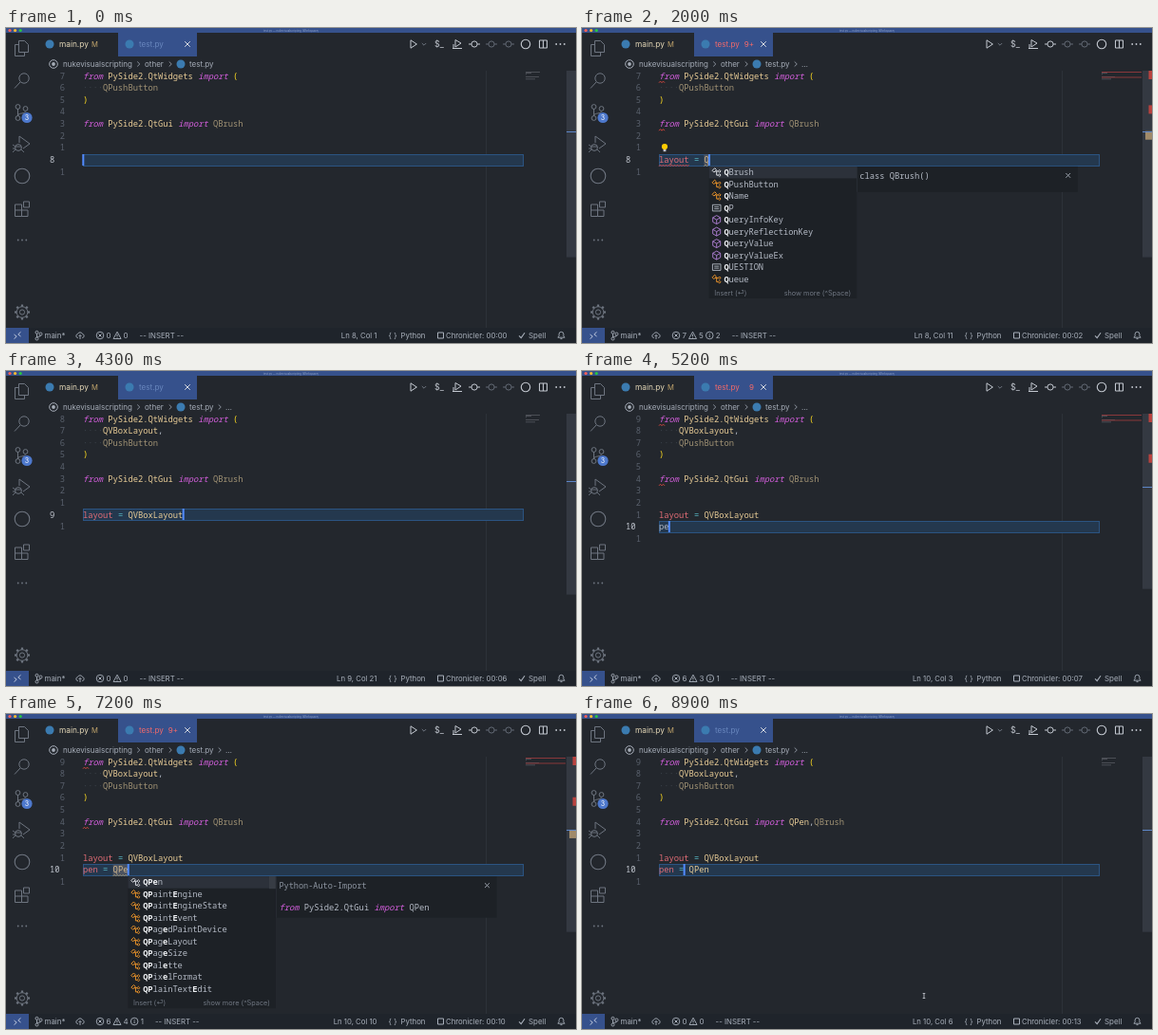
Animation of 600x332 px, one loop 9 s. Source, as an HTML page with a canvas:

```html
<!DOCTYPE html>
<html lang="en">
<head>
<meta charset="utf-8">
<title>Editor auto import</title>
<style>
html, body { margin: 0; width: 100%; height: 100%; overflow: hidden; background: #23272d; }
canvas { display: block; width: 600px; height: 332px; }
</style>
</head>
<body>
<canvas id="stage"></canvas>
<script>
const canvas = document.getElementById('stage');
const g = canvas.getContext('2d');
const dpr = window.devicePixelRatio || 1;
canvas.width = 600 * dpr;
canvas.height = 332 * dpr;

const LOOP = 9000, CW = 5.27, ROW = 12.63, LEFT = 81, TOP = 50.5;
const MONO = '"Noto Sans Mono", "DejaVu Sans Mono", monospace';
const SANS = 'Inter, Roboto, sans-serif';
const C = {
  bg: '#23272d', blue: '#36518c', text: '#b4bac5', dim: '#6e7580', key: '#d55fde',
  type: '#e8cc96', faded: '#a09274', red: '#e06c75', op: '#56b6c2', panel: '#1d2126',
  err: '#e0483e', orange: '#e8922a', purple: '#b180d7', white: '#d7dae0', paren: '#ffdc20'
};

// What is typed on the current line, by time.
const typed = [
  [0, ''], [300, 'l'], [400, 'la'], [600, 'lay'], [700, 'layo'], [900, 'layou'],
  [1000, 'layout'], [1200, 'layout '], [1400, 'layout ='], [1600, 'layout = '],
  [1900, 'layout = Q'], [2700, 'layout = QV'], [3200, 'layout = QVB'],
  [4200, 'layout = QVBoxLayout'], [4700, ''], [5000, 'p'], [5200, 'pe'], [5500, 'pen'],
  [5700, 'pen '], [5900, 'pen ='], [6200, 'pen = '], [6500, 'pen = Q'], [6800, 'pen = QP'],
  [7100, 'pen = QPe'], [7900, 'pen = QPen']
];
// Errors, warnings, hints.
const problems = [
  [0, [0, 0, 0]], [300, [7, 4, 3]], [1400, [7, 5, 2]], [2600, [0, 1, 0]], [4200, [0, 0, 0]],
  [4900, [6, 3, 1]], [5900, [6, 4, 1]], [7900, [0, 0, 0]]
];
const boxDoc = { head: 'Python-Auto-Import', module: 'QtWidgets' };
const popups = [
  [0, null],
  [500, { doc: boxDoc, pale: true, thumb: 83, items: 'QBoxLayout QFormLayout QGridLayout QHBoxLayout QPageLayout QTextLayout QVBoxLayout QStackedLayout QGraphicsLayout QGraphicsLayoutItem' }],
  [1200, null],
  [1900, { doc: { head: 'class QBrush()' }, pale: true, thumb: 0, kinds: 'cccwmmmmwc', items: 'QBrush QPushButton QName QP QueryInfoKey QueryReflectionKey QueryValue QueryValueEx QUESTION Queue' }],
  [2700, { doc: boxDoc, thumb: 72, items: 'QVBoxLayout QTableView QDoubleValidator QAccessibleValueChange… QAccessibleValueInterf… QAbstractItemView QToolBarChangeEvent QTabletEvent QAccessibleEvent QOpenGLVertexArrayObje…' }],
  [4200, null],
  [6600, { doc: { head: 'Python-Auto-Import', module: 'QtGui' }, pale: true, thumb: 13, items: 'QPen QPaintEngine QPaintEngineState QPaintEvent QPagedPaintDevice QPageLayout QPageSize QPalette QPixelFormat QPlainTextEdit' }],
  [7900, null]
];

const at = (list, t) => list.reduce((v, s) => (t >= s[0] ? s[1] : v), list[0][1]);
const rowY = r => TOP + r * ROW;

function rect(x, y, w, h, color) {
  g.fillStyle = color;
  g.fillRect(x, y, w, h);
}
function text(s, x, y, color, font, align = 'left') {
  g.font = font;
  g.textAlign = align;
  g.fillStyle = color;
  g.fillText(s, x, y + 0.5);
}
const sans = (s, x, y, color, size = 8, align) => text(s, x, y, color, size + 'px ' + SANS, align);
const mono = (s, x, y, color, style = '', align) => text(s, x, y, color, style + ' 8.78px ' + MONO, align);

function disc(x, y, r, color) {
  g.fillStyle = color;
  g.beginPath();
  g.arc(x, y, r, 0, 7);
  g.fill();
}
function ring(x, y, r, color, lw = 1) {
  g.strokeStyle = color;
  g.lineWidth = lw;
  g.beginPath();
  g.arc(x, y, r, 0, 7);
  g.stroke();
}
function path(x, y, d, color, lw = 1) {
  g.save();
  g.translate(x, y);
  g.strokeStyle = color;
  g.lineWidth = lw;
  g.stroke(new Path2D(d));
  g.restore();
}
const cross = (x, y, r, color) => path(x, y, `M${-r} ${-r}L${r} ${r}M${r} ${-r}L${-r} ${r}`, color);
const chevron = (x, y) => path(x, y, 'M-1.3 -2.5L1.3 0L-1.3 2.5', '#8a919c');
const dots = (x, y, color) => [-4.3, 0, 4.3].forEach(d => disc(x + d, y, 0.9, color));

// Draws [text, colour, style] pieces in a row.
function run(x, y, parts) {
  for (const [s, color, style] of parts) {
    mono(s, x, y, color, style);
    x += s.length * CW;
  }
}
const importLine = (module, names, color = C.type) => [
  ['from', C.key, 'italic'], [' PySide2.' + module + ' ', color], ['import', C.key, 'italic'], [' ', C.text], ...names
];

function squiggle(x, y, w, color) {
  g.strokeStyle = color;
  g.lineWidth = 0.9;
  g.beginPath();
  for (let i = 0; i <= w; i += 1.5) g.lineTo(x + i, y + (i % 3 ? -0.8 : 0.8));
  g.stroke();
}

function drawTitle() {
  rect(0, 0, 600, 5, C.blue);
  ['#ff5f57', '#febc2e', '#28c840'].forEach((c, i) => disc(4 + i * 5.6, 2.5, 1.6, c));
  sans('test.py — nukevisualscripting (Workspace)', 300, 2.2, '#8fa2c8', 2.9, 'center');
}

function drawTabs(p) {
  disc(46, 17, 4.5, '#3b7bb0');
  sans('main.py', 56, 17.5, '#e6d9b8', 8.3);
  sans('M', 90, 17.5, '#c2a56c', 7.6);
  rect(118, 5, 83, 25, C.blue);
  disc(130, 17, 4.5, '#3b7bb0');
  const count = p[0] + p[1];
  const color = p[0] ? '#f0696a' : p[1] ? C.type : '#6886bd';
  sans('test.py', 140, 17.5, color, 8.1);
  if (count) sans(count > 9 ? '9+' : String(count), 181, 17.5, color, 8, 'right');
  cross(191, 17, 2.8, C.white);
}

function drawToolbar() {
  const c = '#c3c8d0', low = '#626974';
  path(429, 17, 'M-3 -4.2L3.4 0L-3 4.2Z', c);
  path(440, 17, 'M-2.2 -1L0 1.2L2.2 -1', C.dim);
  sans('$_', 451, 17, c, 9);
  path(475, 17, 'M-2 -4.5L4 -1L-2 3ZM-5 4.5H5M-4 0V4', c);
  [[493, c], [511, low], [529, low]].forEach(([x, col]) => {
    ring(x, 17, 3.1, col);
    path(x, 17, 'M-6 0H-3.1M3.1 0H6', col);
  });
  ring(547, 17, 4.7, c, 1.1);
  path(565.5, 17, 'M-4 -4H4V4H-4ZM0 -4V4', c);
  dots(583.5, 17, c);
}

function drawCrumbs(more) {
  const c = '#a6adb8';
  ring(50, 38, 4.3, c);
  disc(50, 38, 1.9, c);
  sans('nukevisualscripting', 60, 38, c);
  chevron(139.5, 38);
  sans('other', 146, 38, c);
  chevron(173, 38);
  disc(184, 38, 4.5, '#3b7bb0');
  sans('test.py', 193, 38, c);
  if (more) {
    chevron(225, 38);
    sans('…', 231, 38, c);
  }
}

function drawSidebar() {
  const c = C.dim, lw = 1;
  path(16.5, 21.5, 'M-3 -8H3L7 -4V4H-3ZM-3 -4H-7V8H3V4', c, lw);
  ring(19, 53, 5.2, c, lw);
  path(15, 57, 'M0 0L-6 6.5', c, lw);
  ring(12.5, 83, 2.4, c, lw);
  ring(12.5, 95, 2.4, c, lw);
  ring(20.5, 85, 2.4, c, lw);
  path(12.5, 89, 'M0 -4V4M8 -1.5C8 2 1 0 0 3', c, lw);
  disc(22, 94.5, 5.6, '#4d78cc');
  sans('3', 22, 94.5, '#fff', 7, 'center');
  path(17, 122, 'M-3 -1V-8L8 0L1 5', c, lw);
  ring(13, 126, 3.4, c, lw);
  path(13, 126, 'M-6 -3L-3 -1M-6 1H-3M-6 5L-3 2M6 5L3 2M-3 -1H3', c, 0.9);
  ring(17, 156, 7.8, c, 1.1);
  path(16.5, 190.5, 'M-7 -4.5H0V8H-7ZM-7 1.5H6.5V8H0M2 -7.5H8V-1.5H2Z', c, lw);
  dots(17, 223.5, c);
  ring(17, 299.5, 2.6, c, lw);
  ring(17, 299.5, 5.8, c, lw);
  for (let i = 0; i < 8; i++) {
    const a = i * Math.PI / 4, x = Math.cos(a), y = Math.sin(a);
    path(17, 299.5, `M${x * 5.8} ${y * 5.8}L${x * 8} ${y * 8}`, c, 2.2);
  }
}

// Minimap, scrollbar and its marks; the marks move closer as lines are added.
function drawEdges(p, row, s) {
  const pitch = 9.1 - (row - 7) * 0.275;
  const markY = r => 45 + r * pitch;
  rect(505, 45, 1, 271, '#2d3239');
  for (let i = 0; i < 7; i++) rect(547, 46 + i * 1.25, [15, 6, 1, 0, 14, 0, 10][i], 0.7, '#5d6068');
  if (p[0]) [46, 51.5].forEach(y => rect(547, y, 42, 1, '#8a383b'));
  rect(590, 45, 10, pitch * 21.6, '#343942');
  if (p[0]) [0, row - 3 - (row === 9 ? 1 : 0)].forEach(r => rect(596.5, markY(r), 3.5, 9, '#b8433f'));
  if (p[1] && s.length > 3) rect(593, markY(row), 7, 9, s.includes('=') ? '#a08a6a' : '#a34a48');
  rect(590, Math.round(markY(row)), 10, 1, '#5d86c8');
}

function drawCode(t, s, row, p, caret) {
  const second = t >= 4200, done = t >= 7900;
  const shift = second ? 1 : 0;
  const y = rowY(row), top = Math.round(y - 6.3);
  rect(LEFT, top, 464, 12, '#24384e');
  g.strokeStyle = '#2b5482';
  g.lineWidth = 1;
  g.strokeRect(LEFT + 0.5, top + 0.5, 463, 12);

  for (let r = 0; r <= row + 1; r++) {
    if (r === row) mono(String(r + 1), 46, rowY(r), '#c5cad3');
    else mono(String(Math.abs(row - r)), 62, rowY(r), '#59606c', '', 'right');
  }

  const indent = ['····', '#3d434c'];
  run(LEFT, rowY(0), importLine('QtWidgets', [['(', C.paren]]));
  if (shift) run(LEFT, rowY(1), [indent, ['QVBoxLayout', C.type], [',', C.text]]);
  run(LEFT, rowY(1 + shift), [indent, ['QPushButton', C.faded]]);
  run(LEFT, rowY(2 + shift), [[')', C.paren]]);
  const names = [['QBrush', C.faded]];
  if (done) names.unshift(['QPen', C.type], [',', C.text]);
  run(LEFT, rowY(4 + shift), importLine('QtGui', names));
  if (p[0]) [0, 4 + shift].forEach(r => squiggle(LEFT, rowY(r) + 6.4, 6, C.err));

  if (row === 9) drawAssign('layout = QVBoxLayout', rowY(8), true);
  drawAssign(s, y, done || (second && row === 8));
  if (row === 7 && p[0] && s) squiggle(LEFT, y + 6, Math.min(s.length, 6) * CW, C.err);

  rect(LEFT + caret * CW - 0.7, top, 2, 12, '#528bff');
  if (t >= 1900 && t < 2600) {
    disc(87, 125, 3.1, '#ffcc00');
    rect(85.6, 128, 2.8, 2.2, '#c9c9c9');
  }
}

function drawAssign(s, y, known) {
  const i = s.indexOf('=');
  if (i < 0) return mono(s, LEFT, y, C.text);
  const value = s.slice(i + 2), x = LEFT + (i + 2) * CW;
  if (value && !known) {
    rect(x, y - 5.6, value.length * CW, 11.2, '#4c5360');
    squiggle(x, y + 6, value.length * CW, '#b39a70');
  }
  run(LEFT, y, [[s.slice(0, i), C.red], ['= ', C.op], [value, known ? C.type : '#cfb68c']]);
}

// Indices of the letters in a name that the query matches.
function matches(name, query) {
  const start = name.toLowerCase().indexOf(query.toLowerCase());
  return [...query].map((ch, k) => {
    if (start >= 0) return start + k;
    const upper = name.indexOf(ch.toUpperCase());
    return upper >= 0 ? upper : name.indexOf(ch.toLowerCase());
  });
}

function itemIcon(x, y, kind, pale) {
  if (kind === 'w') return path(x, y, 'M-4.3 -3.3H4.3V3.3H-4.3ZM-2.5 -1H2.5M-2.5 1H2.5', C.text, 0.9);
  if (kind === 'm') return path(x, y, 'M0 -4.5L4 -2.3V2.3L0 4.5L-4 2.3V-2.3ZM-4 -2.3L0 0L4 -2.3M0 0V4.5', C.purple, 0.9);
  path(x, y, 'M-4.6 -1.8L-2 -4.4L-0.2 -2.6L-2.8 0ZM-1.6 -1.2H1.6M0 -1.2V3H1.6M1.6 -1.2L3 -2.6L4.4 -1.2L3 0.2ZM1.6 3L3 1.6L4.4 3L3 4.4Z',
    pale ? C.white : C.orange, 1);
}

function drawPopup(pop, s, row) {
  const x = LEFT + s.length * CW, y = rowY(row) + 7, w = 155.5;
  const query = s.split(' ').pop();
  const items = pop.items.split(' ');
  rect(x, y, w, 139, C.panel);
  rect(x, y, w, 12.5, '#2c313a');
  items.forEach((name, i) => {
    const iy = y + 6.2 + i * 12.5, hit = matches(name, query);
    itemIcon(x + 8, iy, pop.kinds ? pop.kinds[i] : 'c', pop.pale && i === 0);
    [...name].forEach((ch, k) => {
      const on = hit.includes(k);
      mono(ch, x + 15.7 + k * 5.21, iy, on ? '#f0f2f5' : C.text, on ? 'bold' : '');
    });
  });
  rect(x + w - 7, y, 7, pop.thumb, '#373c44');
  sans('Insert (⏎)', x + 5.5, y + 133, '#6f7681', 7.3);
  sans('show more (^Space)', x + w - 6, y + 133, '#6f7681', 7.3, 'right');

  const { head, module } = pop.doc, dx = x + w, h = module ? 43.5 : 27;
  rect(dx, y, 232.5, h, C.panel);
  rect(dx, y, 0.7, h, '#2d323a');
  if (module) {
    text(head, dx + 3.5, y + 10, '#8d95a1', '8.55px ' + MONO);
    run(dx + 3.5, y + 33, importLine(module, [[items[0], C.text]], C.text));
  } else {
    mono(head, dx + 3, y + 10, C.text);
  }
  cross(dx + 222.5, y + 9.5, 2.4, '#9ba1ac');
}

function drawStatus(t, p, row, caret) {
  const c = '#a9b0bb', y = 324;
  rect(0, 316, 600, 16, '#1f242b');
  rect(0, 316, 24, 16, C.blue);
  path(12, y, 'M-3.5 -1L-0.8 1.2L-3.5 3.6M3.5 -3.6L0.8 -1.2L3.5 1', '#c9d2e4', 0.9);
  ring(32.5, 320.8, 1.5, c, 0.9);
  ring(32.5, 327.5, 1.5, c, 0.9);
  ring(36.5, 322.5, 1.5, c, 0.9);
  path(32.5, 322.3, 'M0 0V3.7M4 1.7C4 3.5 1 2.5 0 3.5', c, 0.9);
  sans('main*', 40.5, y, c, 7.9);
  path(78, y, 'M-2 2.5H-2.6A2 2 0 0 1 -2.6 -1.4A2.8 2.8 0 0 1 2.6 -1.4A2 2 0 0 1 2.6 2.5H2M0 4V-0.5M-1.5 1L0 -0.5L1.5 1', c, 0.9);

  let x = 95;
  p.forEach((n, i) => {
    if (i === 2 && !n) return;
    const cx = x + 4;
    if (i === 1) path(cx, y, 'M0 -3.8L4 3.5H-4ZM0 -1.2V1.2M0 1.9V2.7', c, 0.9);
    else ring(cx, y, 3.8, c, 0.9);
    if (i === 0) cross(cx, y, 1.5, c);
    if (i === 2) path(cx, y, 'M0 -2V-1.1M0 -0.4V2', c, 0.9);
    sans(String(n), x + 10.5, y, c);
    x += 13 + g.measureText(n).width;
  });
  sans('-- INSERT --', x + 9.5, y, c, 7.8);

  sans(`Ln ${row + 1}, Col ${caret + 1}`, 390.5, y, c, 7.75, 'right');
  sans('{ }', 402.5, y, c, 8);
  sans('Python', 415.5, y, c, 7.8);
  path(457.5, y, 'M-3 -3H3V3H-3Z', c);
  const sec = Math.floor(t * 0.00147);
  sans('Chronicler: 00:' + String(sec).padStart(2, '0'), 463, y, c, 7.8);
  path(543, y, 'M-3 0.3L-0.8 2.6L3 -2.8', c, 1.1);
  sans('Spell', 550, y, c, 7.9);
  path(584.5, y, 'M-3.6 2.2H3.6L2.4 0.5V-1.3A2.4 2.4 0 0 0 -2.4 -1.3V0.5ZM-1 3.6H1', c, 0.9);
}

function draw(t) {
  const s = at(typed, t), p = at(problems, t), pop = at(popups, t);
  const row = t >= 4700 ? 9 : t >= 4200 ? 8 : 7;
  const back = Math.max(0, Math.min(5, Math.floor((t - 8200) / 100)));
  const caret = s.length - back;
  g.setTransform(dpr, 0, 0, dpr, 0, 0);
  g.textBaseline = 'middle';
  rect(0, 0, 600, 332, C.bg);
  drawEdges(p, row, s);
  drawCode(t, s, row, p, caret);
  drawTitle();
  drawTabs(p);
  drawToolbar();
  drawCrumbs(t >= 1400);
  drawSidebar();
  if (pop) drawPopup(pop, s, row);
  drawStatus(t, p, row, caret);
  if (t >= 8300) path(360, 297, 'M-1.3 -2.5H1.3M-1.3 2.5H1.3M0 -2.5V2.5', '#d0d4da', 0.8);
}

const start = performance.now();
function tick() {
  draw((performance.now() - start) % LOOP);
  requestAnimationFrame(tick);
}
tick();
</script>
</body>
</html>
```
